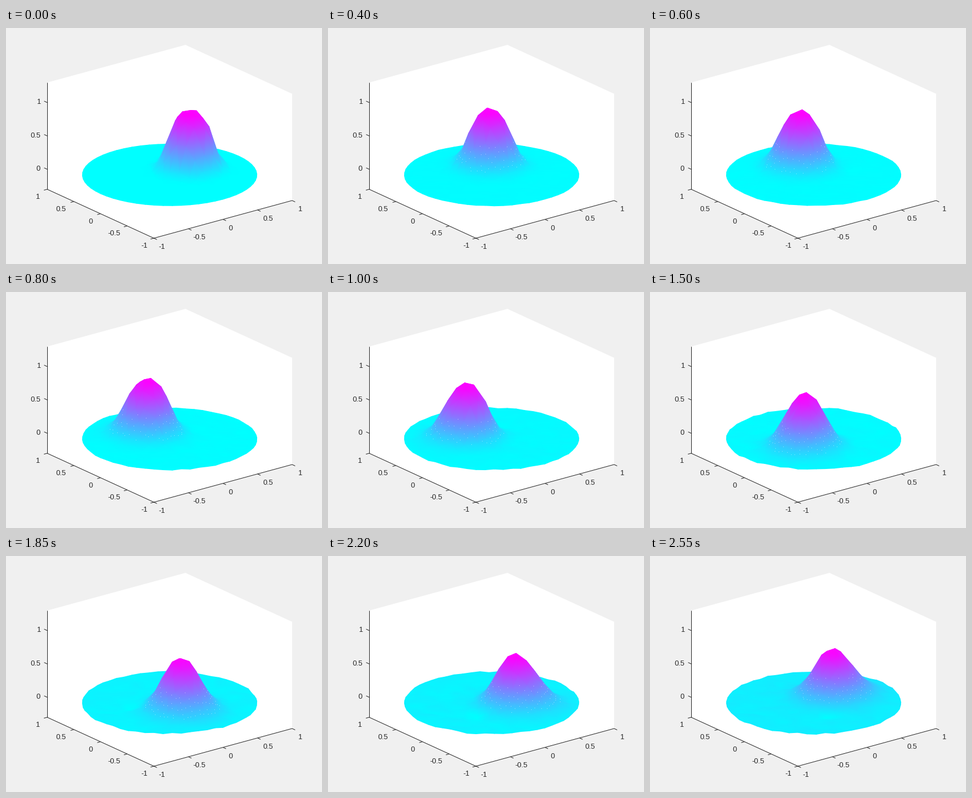
Write a matplotlib script that moves like this. It is 560 px wide and 420 px high and loops after 2600 ms.

```python
import numpy as np
import matplotlib.pyplot as plt
from matplotlib.animation import FuncAnimation
from matplotlib.collections import TriMesh
from matplotlib.tri import Triangulation

W, H, DPI = 560, 420, 100
FRAMES, INTERVAL = 52, 50
INK = "#262626"
LINE = 72 / DPI
Z_LOW, Z_HIGH = -0.3, 1.3
RINGS = 10

rng = np.random.default_rng(4)


def project(x, y, z):
    """Orthographic view of the unit box, in stage pixels."""
    px = 290 + 122.5 * x - 94.5 * y
    py = 261.4 - 33.5 * x - 43.5 * y - 118.75 * z
    return px, py


def disc_points():
    """Rings of evenly spaced points, slightly shaken inside the rim."""
    xs, ys = [0.0], [0.0]
    for k in range(1, RINGS + 1):
        angle = 2 * np.pi * np.arange(6 * k) / (6 * k)
        shake = 0.01 if k < RINGS else 0
        xs.extend(k / RINGS * np.cos(angle) + rng.normal(0, shake, 6 * k))
        ys.extend(k / RINGS * np.sin(angle) + rng.normal(0, shake, 6 * k))
    return np.array(xs), np.array(ys)


X, Y = disc_points()
depth = 0.61 * X + 0.792 * Y
mesh = Triangulation(X, Y)
edges = mesh.edges
triangles = mesh.triangles[np.argsort(-depth[mesh.triangles].mean(axis=1))]

phase = rng.uniform(0, 2 * np.pi, X.size)
speed = rng.integers(3, 8, X.size)
ripple_size = rng.uniform(0.3, 1, X.size)


def hill_centre(t):
    radius = 0.3 - 0.045 * np.sqrt(t)
    return radius, 2 * np.pi * t


def height(t):
    """Hill carried round the disc, spreading outwards as it goes."""
    radius, angle = hill_centre(t)
    c, s = np.cos(angle), np.sin(angle)
    out = X * c + Y * s - radius
    along = Y * c - X * s
    stretch = np.where(out > 0, 1 + 0.33 * t ** 0.6, 1 - 0.05 * t)
    d2 = (out / stretch) ** 2 + (along / (1 + 0.05 * t)) ** 2

    sharp = 0.5 * (1 - np.tanh(d2 / 0.0625 - 1))
    soft = 0.885 * np.exp(-d2 / 0.08)
    mix = np.sqrt(t)
    hill = (1 - 0.16 * t ** 1.3) * ((1 - mix) * sharp + mix * soft)

    # shallow dip trailing behind the hill
    back = angle - 1.8
    dip2 = (X - 0.42 * np.cos(back)) ** 2 + (Y - 0.42 * np.sin(back)) ** 2
    dip = 0.07 * t * np.exp(-dip2 / 0.015)

    ripple = 0.014 * min(1, 2 * t) * ripple_size
    ripple = ripple * np.sin(phase + 2 * np.pi * speed * t)
    return hill - dip + ripple * (1 - np.clip(hill, 0, 1))


fig = plt.figure(figsize=(W / DPI, H / DPI), dpi=DPI, facecolor="#f0f0f0")
ax = fig.add_axes([0, 0, 1, 1])
ax.set_xlim(0, W)
ax.set_ylim(H, 0)
ax.axis("off")


def line(start, end):
    ax.plot([start[0], end[0]], [start[1], end[1]], color=INK, lw=LINE,
            solid_capstyle="butt", zorder=1)


def tick(point, step, value, label_at, align="center"):
    line(point, (point[0] + step[0], point[1] + step[1]))
    ax.text(*label_at, f"{value:g}", color=INK, family="Liberation Sans",
            size=13 * LINE, ha=align, va="center_baseline", zorder=1)


def draw_box():
    walls = [(-1, 1, Z_LOW), (-1, 1, Z_HIGH), (1, 1, Z_HIGH),
             (1, -1, Z_HIGH), (1, -1, Z_LOW), (-1, -1, Z_LOW)]
    corners = [project(*p) for p in walls]
    ax.fill(*zip(*corners), color="white", lw=0, zorder=0)
    line(corners[0], corners[1])
    line(corners[0], corners[5])
    line(corners[5], corners[4])

    for v in (-1, -0.5, 0, 0.5, 1):
        px, py = project(v, -1, Z_LOW)
        shift = 19 if v in (-0.5, 0.5) else 14
        tick((px, py), (5.4, 2.5), v, (px + shift, py + 14.5))
        px, py = project(-1, v, Z_LOW)
        shift = 23 if v in (-0.5, 0.5) else 17
        tick((px, py), (-5.8, 1.6), v, (px - shift, py + 12.5))
    for v in (0, 0.5, 1):
        px, py = project(-1, 1, v)
        tick((px, py), (-5.4, -2.5), v, (61, py - 2), "right")


draw_box()
specks, = ax.plot([], [], ",", color="white", alpha=0.45, zorder=3)
surface = None


def draw(frame):
    global surface
    t = frame / (FRAMES - 1)
    z = height(t)
    px, py = project(X, Y, z)

    if surface is not None:
        surface.remove()
    surface = TriMesh(Triangulation(px, py, triangles), cmap="cool", zorder=2)
    surface.set_array(z)
    surface.set_clim(z.min(), 0.96 * z.max())
    ax.add_collection(surface, autolim=False)

    # pinholes along the mesh edges of the near slope
    radius, angle = hill_centre(t)
    middle = radius * (0.61 * np.cos(angle) + 0.792 * np.sin(angle))
    mid_z, mid_depth = z[edges].mean(axis=1), depth[edges].mean(axis=1)
    near = (mid_z > 0.08) & (mid_z < 0.4) & (mid_depth < middle) & (t > 0.1)
    holes = edges[near]
    specks.set_data(px[holes].mean(axis=1), py[holes].mean(axis=1))
    return surface, specks


anim = FuncAnimation(fig, draw, frames=FRAMES, interval=INTERVAL,
                     repeat=True, repeat_delay=0, blit=False)
plt.show()
```
